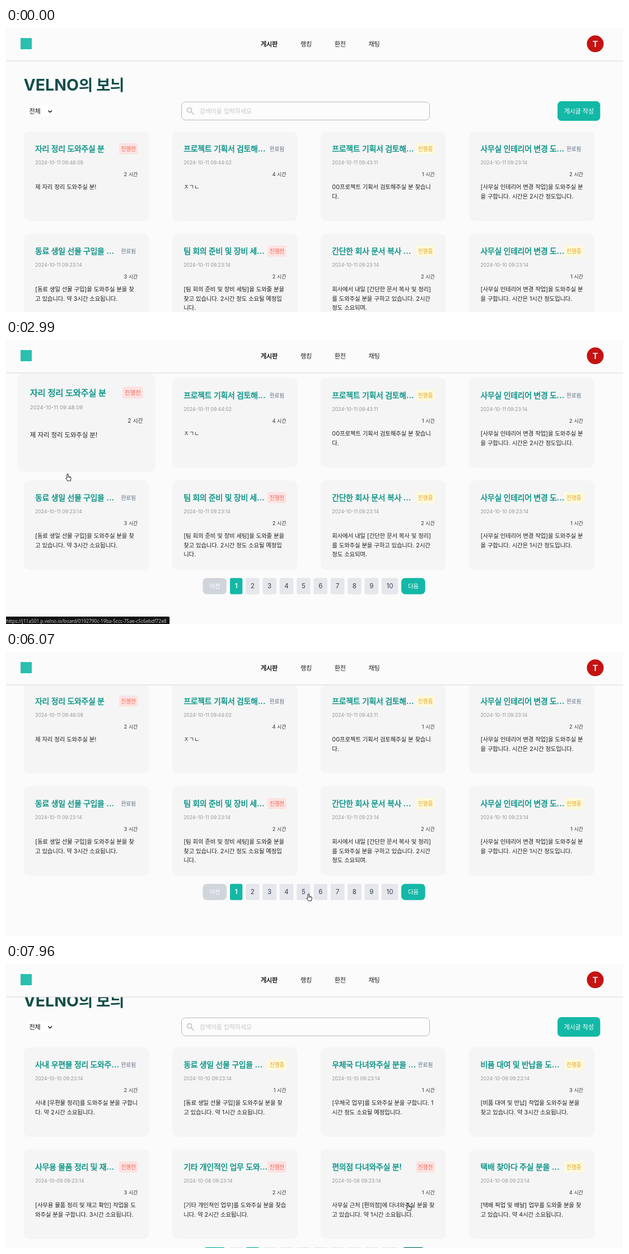
Recreate the animation shown at these times as an HTML page with a canvas. Size 1102 px wide and 508 px high, loop 8 s.

```html
<!DOCTYPE html>
<html lang="ko">
<head>
<meta charset="utf-8">
<title>게시판</title>
<style>
html, body { margin: 0; width: 100%; height: 100%; overflow: hidden; background: #fbfbfb; }
canvas { display: block; width: 1102px; height: 508px; }
</style>
</head>
<body>
<canvas id="stage"></canvas>
<script>
const W = 1102, H = 508, LOOP = 8000, TICK = 70;
const canvas = document.getElementById('stage');
const ctx = canvas.getContext('2d');
const dpr = window.devicePixelRatio || 1;
canvas.width = W * dpr;
canvas.height = H * dpr;

const TEAL = '#14b8a6', DARK_TEAL = '#0f766e';
const STATES = {
  wait: ['진행전', '#fee2e2', '#ef6351'],
  busy: ['진행중', '#fef9dc', '#e3a51c'],
  done: ['완료됨', '#f3f5f7', '#6b7280'],
};

// title, state, date, hours, body lines
const PAGES = [[
  ['자리 정리 도와주실 분', 'wait', '10-11 09:48:09', 2, '제 자리 정리 도와주실 분!'],
  ['프로젝트 기획서 검토해...', 'done', '10-11 09:44:02', 4, 'ㅈㄱㄴ'],
  ['프로젝트 기획서 검토해...', 'busy', '10-11 09:43:11', 1, '00프로젝트 기획서 검토해주실 분 찾습니|다.'],
  ['사무실 인테리어 변경 도...', 'done', '10-11 09:23:14', 2, '[사무실 인테리어 변경 작업]을 도와주실 분|을 구합니다. 시간은 2시간 정도입니다.'],
  ['동료 생일 선물 구입을 ...', 'done', '10-11 09:23:14', 3, '[동료 생일 선물 구입]을 도와주실 분을 찾|고 있습니다. 약 3시간 소요됩니다.'],
  ['팀 회의 준비 및 장비 세...', 'wait', '10-11 09:23:14', 2, '[팀 회의 준비 및 장비 세팅]을 도와줄 분을|찾고 있습니다. 2시간 정도 소요될 예정입|니다.'],
  ['간단한 회사 문서 복사 ...', 'busy', '10-11 09:23:14', 2, '회사에서 내일 [간단한 문서 복사 및 정리]|를 도와주실 분을 구하고 있습니다. 2시간|정도 소요되며.'],
  ['사무실 인테리어 변경 도...', 'busy', '10-10 09:23:14', 1, '[사무실 인테리어 변경 작업]을 도와주실 분|을 구합니다. 시간은 1시간 정도입니다.'],
], [
  ['사내 우편물 정리 도와주...', 'done', '10-10 09:23:14', 2, '사내 [우편물 정리]를 도와주실 분을 구합니|다. 약 2시간 소요됩니다.'],
  ['동료 생일 선물 구입을 ...', 'busy', '10-10 09:23:14', 1, '[동료 생일 선물 구입]을 도와주실 분을 찾|고 있습니다. 약 1시간 소요됩니다.'],
  ['우체국 다녀와주실 분을 ...', 'done', '10-10 09:23:14', 1, '[우체국 업무]를 도와주실 분을 구합니다. 1|시간 정도 소요될 예정입니다.'],
  ['비품 대여 및 반납을 도...', 'busy', '10-09 09:23:14', 3, '[비품 대여 및 반납] 작업을 도와주실 분을|찾고 있습니다. 약 3시간 소요됩니다.'],
  ['사무용 물품 정리 및 재...', 'wait', '10-09 09:23:14', 3, '[사무용 물품 정리 및 재고 확인] 작업을 도|와주실 분을 구합니다. 3시간 소요됩니다.'],
  ['기타 개인적인 업무 도와...', 'wait', '10-08 09:23:14', 2, '[기타 개인적인 업무]를 도와주실 분을 찾습|니다. 약 2시간 소요됩니다.'],
  ['편의점 다녀와주실 분!', 'wait', '10-08 09:23:14', 1, '사무실 근처 [편의점]에 다녀와주실 분을 찾|고 있습니다. 약 1시간 소요됩니다.'],
  ['택배 찾아다 주실 분을 ...', 'busy', '10-08 09:23:14', 4, '[택배 픽업 및 배달] 업무를 도와줄 분을 찾|고 있습니다. 약 4시간 소요됩니다.'],
]];
const SECOND_ROW_IDS = ['01581629', '015926ac', '015a41d7', '015b5a1b'];

// turning points of the pointer: time, x, y
const PATH = [
  [260, 1093, 496], [880, 1066, 175], [1040, 1031, 116], [1660, 385.5, 93.5],
  [1880, 262, 128], [2600, 110, 239], [3260, 110, 239], [3820, 294, 331],
  [4760, 868, 400], [5150, 837, 430], [5760, 457, 434], [6700, 718, 428],
];

const CARD = { w: 224, h: 160 };
const WRITE = { x: 985, y: 131, w: 76.3, h: 35 };
const PAGER = { x: 351.5, y: 542.7, w: 397.2, h: 29 };
const NEXT = { ...PAGER, x: 706, w: 42.7 };

const ARROW = new Path2D('M0 0V10.6L2.5 8.4 4.1 12 5.8 11.3 4.2 7.8H7.5Z');
const HAND = new Path2D('M-1.1 1Q0-.7 1.1 1V5L5 6Q6.4 6.4 6.2 8L5.4 11V13H-.2L-3.4 8.4Q-2.8 7-1.1 8.3Z');

const clamp = v => Math.max(0, Math.min(1, v));
const smooth = u => u * u * (3 - 2 * u);
const glide = (t, start) => smooth(clamp((t - start) / 315));
const scrollAt = t => Math.round(128 * (glide(t, 2732) - glide(t, 7745)));

// the screen refreshes in even ticks, counted anew after the first scroll
function snap(t) {
  const start = t < 3260 ? 260 : 3260;
  return t < start ? 0 : start + Math.floor((t - start + 1) / TICK) * TICK;
}

function pointerAt(t) {
  const i = PATH.findIndex(p => p[0] > t);
  if (i < 1) {
    const [time, x, y] = PATH[i < 0 ? PATH.length - 1 : 0];
    return { x, y, moved: time };
  }
  const [t0, x0, y0] = PATH[i - 1], [t1, x1, y1] = PATH[i];
  const u = (t - t0) / (t1 - t0);
  const still = x0 === x1 && y0 === y1;
  return { x: x0 + (x1 - x0) * u, y: y0 + (y1 - y0) * u, moved: still ? t0 : t };
}

const cardBox = i => ({ x: 31.5 + (i % 4) * 265.15, y: 185 + Math.floor(i / 4) * 183, ...CARD });

// hovering is only re-evaluated while the pointer moves
function hits(t, area, padX = 0, padY = 0) {
  const p = pointerAt(t);
  const x = p.x - area.x, y = p.y + scrollAt(p.moved) - area.y;
  return x > -padX && x < area.w + padX && y > -padY && y < area.h + padY;
}
const hitsCard = (t, i) => hits(t, cardBox(i), 12, 8);
const cardAt = t => PAGES[0].findIndex((_, i) => hitsCard(t, i));

// late, short ramp: the mean of the recent hover state
function growth(t, i) {
  let sum = 0;
  for (let lag = 90; lag < 150; lag += 10) sum += hitsCard(t - lag, i);
  return sum / 6;
}

function box(x, y, w, h, r, fill) {
  ctx.beginPath();
  ctx.roundRect(x, y, w, h, r);
  ctx.fillStyle = fill;
  ctx.fill();
}

const isHangul = run => /[ㄱ-힣]/.test(run);

// Hangul is set slightly smaller and tighter than the Latin beside it.
function setRun(run, size, weight) {
  const hangul = isHangul(run);
  ctx.font = hangul
    ? `${weight > 600 ? 700 : 400} ${size * 0.96}px "Noto Sans CJK KR", "Noto Sans CJK", sans-serif`
    : `${weight} ${size}px Inter, sans-serif`;
  ctx.letterSpacing = hangul ? `${-0.019 * size}px` : '0px';
}

// y is the middle of the line; align 0 left, 0.5 centre, 1 right
function text(str, x, y, size, color, weight = 400, align = 0) {
  const runs = str.match(/[ㄱ-힣]+|[^ㄱ-힣]+/g);
  const widths = runs.map(run => {
    setRun(run, size, weight);
    return ctx.measureText(run).width;
  });
  x -= align * widths.reduce((a, b) => a + b, 0);
  ctx.fillStyle = ctx.strokeStyle = color;
  ctx.lineWidth = size * 0.035;
  runs.forEach((run, i) => {
    setRun(run, size, weight);
    ctx.fillText(run, x, y + size * 0.36);
    // semi-bold Hangul
    if (weight === 600 && isHangul(run)) ctx.strokeText(run, x, y + size * 0.36);
    x += widths[i];
  });
  ctx.letterSpacing = '0px';
}

function drawCard([title, state, date, hours, body], i, grow) {
  const [label, tint, ink] = STATES[state];
  const { x, y, w, h } = cardBox(i);
  ctx.save();
  ctx.translate(x + w / 2, y + h / 2);
  ctx.scale(1 + grow / 10, 1 + grow / 10);
  ctx.translate(-w / 2, -h / 2);
  box(0, 0, w, h, 10, '#f5f5f5');
  text(title, 20.5, 31, 14.5, '#0d9488', 600);
  box(170.5, 21, 33.5, 20, 3, tint);
  text(label, 187.2, 31, 10.15, ink, 400, 0.5);
  text('2024-' + date, 20.5, 55.5, 8.7, '#969696');
  text(hours + ' 시간', 203.7, 76.5, 9.4, '#333', 400, 1);
  body.split('|').forEach((line, n) => text(line, 20.5, 99.5 + n * 16.3, 10.88, '#222'));
  ctx.restore();
}

function drawTools(t) {
  text('VELNO의 보늬', 31.5, 101.5, 28.5, '#134e4a', 700);

  box(37, 139, 51, 19, 3, '#fff');
  text('전체', 41.5, 148.5, 11.6, '#111');
  ctx.lineWidth = 1.5;
  ctx.strokeStyle = '#111';
  ctx.beginPath();
  ctx.moveTo(75.5, 147.5);
  ctx.lineTo(78.7, 150.7);
  ctx.lineTo(81.9, 147.5);
  ctx.stroke();

  box(313.5, 132.3, 443, 32.3, 7, '#fcfcfc');
  ctx.lineWidth = 1;
  ctx.strokeStyle = '#b4b7bc';
  ctx.stroke();
  ctx.lineWidth = 1.8;
  ctx.strokeStyle = '#c6c6c6';
  ctx.beginPath();
  ctx.arc(327.6, 146.8, 4, 0, 7);
  ctx.moveTo(330.8, 150);
  ctx.lineTo(335.8, 154.8);
  ctx.stroke();
  text('검색어를 입력하세요', 345.5, 148.5, 11.6, '#c8c8c8');

  box(WRITE.x, WRITE.y, WRITE.w, WRITE.h, 7, hits(t, WRITE) ? DARK_TEAL : TEAL);
  text('게시글 작성', 1023.1, 148.5, 11.6, '#fff', 400, 0.5);
}

function drawPager(t, current) {
  const { x: left, y, h } = PAGER;
  const mid = y + h / 2;
  box(left, y, 42.5, h, 7, current > 1 ? TEAL : '#d1d5db');
  text('이전', 372.7, mid, 10.88, '#fff', 400, 0.5);
  let x = 400;
  for (let n = 1; n <= 10; n++) {
    const w = n === 1 ? 22.3 : n === 10 ? 29.3 : 24.6;
    const on = n === current;
    box(x, y, w, h, 3, on ? TEAL : '#e5e7eb');
    text(String(n), x + w / 2, mid, 11.6, on ? '#fff' : '#374151', on ? 600 : 400, 0.5);
    x += w + 5.75;
  }
  box(NEXT.x, y, NEXT.w, h, 7, hits(t, NEXT) ? DARK_TEAL : TEAL);
  text('다음', 727.3, mid, 10.88, '#fff', 400, 0.5);
}

function drawHeader() {
  box(0, 0, W, 59, 0, '#fbfbfb');
  box(0, 58.6, W, 1, 0, '#d6d6d6');
  box(26, 18, 20, 20, 0, '#2bbfb0');
  text('게시판', 455, 28.5, 11.6, '#111', 600);
  ['랭킹', '환전', '채팅'].forEach((s, i) => text(s, 526 + i * 60.8, 28.5, 11.6, '#222'));
  ctx.beginPath();
  ctx.arc(1052.4, 28.3, 15, 0, 7);
  ctx.fillStyle = '#c51313';
  ctx.fill();
  text('T', 1052.4, 28.5, 15, '#fff', 600, 0.5);
}

// the address of the last hovered card lingers for a moment
function drawAddress(t) {
  let card = -1;
  for (let lag = 40; lag < 500 && card < 0; lag += 20) card = cardAt(t - lag);
  if (card < 0) return;
  const id = card < 4
    ? '0192790c-19ba-5ccc-75ae-c5c6ebdf72e8'
    : SECOND_ROW_IDS[card - 4] + '-8767-11ef-8995-0242ac120004';
  const url = 'https://j11a501.p.velno.io/board/' + id;
  ctx.font = '8.4px "Open Sans", sans-serif';
  box(0, 494.7, ctx.measureText(url).width + 5.5, 14, [0, 2, 0, 0], '#121212');
  ctx.fillStyle = '#d2d2d2';
  ctx.fillText(url, 0, 505.7);
}

function drawPointer(t) {
  if (t < PATH[0][0]) return;
  const { x, y } = pointerAt(t);
  const hand = cardAt(t) >= 0 || hits(t, WRITE) || hits(t, PAGER);
  const shape = hand ? HAND : ARROW;
  ctx.save();
  ctx.translate(x, y);
  ctx.lineWidth = 1;
  ctx.lineJoin = 'round';
  ctx.fillStyle = '#fff';
  ctx.strokeStyle = '#222';
  ctx.fill(shape);
  ctx.stroke(shape);
  if (hand) {
    ctx.lineWidth = 0.6;
    ctx.beginPath();
    for (let i = 0; i < 3; i++) {
      ctx.moveTo(1.1 + i * 1.65, 5.2);
      ctx.lineTo(1.1 + i * 1.65, 7.6);
    }
    ctx.stroke();
  }
  ctx.restore();
}

function draw(t) {
  ctx.setTransform(dpr, 0, 0, dpr, 0, 0);
  ctx.lineJoin = 'round';
  box(0, 0, W, H, 0, '#fbfbfb');
  ctx.save();
  ctx.translate(0, -scrollAt(t));
  drawTools(t);
  const cards = PAGES[t < 6890 ? 0 : 1];
  cards.forEach((card, i) => drawCard(card, i, growth(t, i)));
  drawPager(t, t < 6830 ? 1 : 2);
  ctx.restore();
  drawHeader();
  drawAddress(t);
  drawPointer(t);
}

function tick() {
  draw(snap(performance.now() % LOOP));
  requestAnimationFrame(tick);
}
tick();
</script>
</body>
</html>
```
